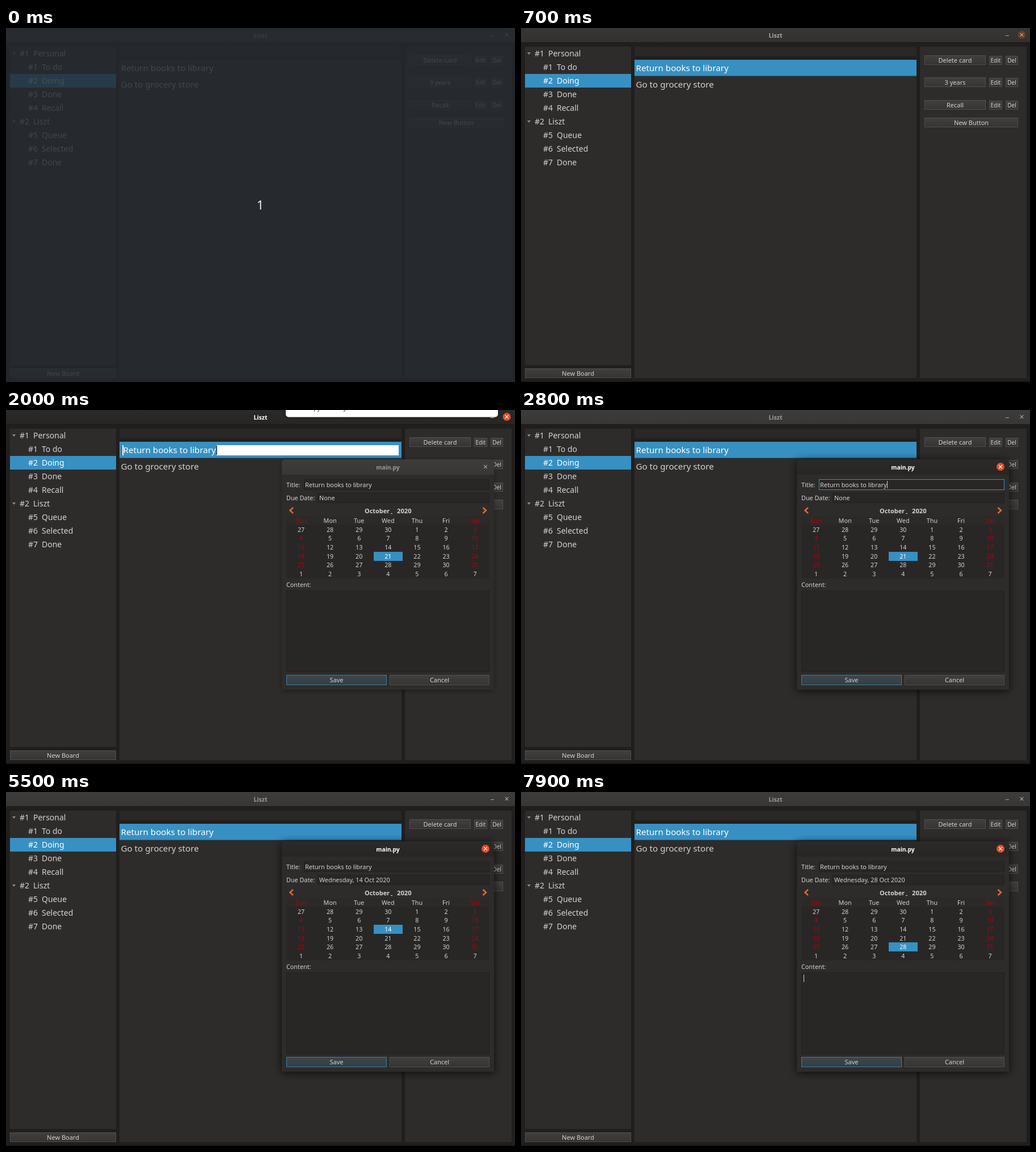
These frames come from a looping animation (897 by 624 pixels, 8000 ms). An HTML page with a canvas:

```html
<!DOCTYPE html>
<html lang="en">
<head>
<meta charset="utf-8">
<title>Card board</title>
<style>
  html, body { margin: 0; width: 100%; height: 100%; overflow: hidden; background: #201f1e; }
  canvas { display: block; }
</style>
</head>
<body>
<canvas id="stage" width="897" height="624"></canvas>
<script>
const c = document.getElementById('stage').getContext('2d');
const BLUE = '#3790c2', PANEL = '#2d2c2b', TEXT = '#d4d3d1', DARK = '#282726', EDGE = '#222120';
const clamp = v => Math.max(0, Math.min(1, v));

function rect(x, y, w, h, fill, border) {
  c.fillStyle = fill;
  c.fillRect(x, y, w, h);
  if (border) {
    c.lineWidth = 1;
    c.strokeStyle = border;
    c.strokeRect(x + .5, y + .5, w - 1, h - 1);
  }
}

function text(s, x, y, size, color = TEXT, align = 'left', weight = 400) {
  c.font = `${weight} ${size}px "Noto Sans", "Open Sans", sans-serif`;
  c.textAlign = align;
  c.fillStyle = color;
  c.fillText(s, x, y);
}

function line(points, color, width = 1) {
  c.beginPath();
  points.forEach(([x, y]) => c.lineTo(x, y));
  c.strokeStyle = color;
  c.lineWidth = width;
  c.stroke();
}

function gradient(y, h, top, bottom) {
  const g = c.createLinearGradient(0, y, 0, y + h);
  g.addColorStop(0, top);
  g.addColorStop(1, bottom);
  return g;
}

function button(label, x, y, w, h, size = 11, active) {
  const fill = active ? gradient(y, h, '#3e464c', '#343d43') : gradient(y, h, '#41403f', '#353433');
  rect(x, y, w, h, fill, active ? '#3a7da3' : '#504f4d');
  text(label, x + w / 2, y + h / 2 + size * .37, size, TEXT, 'center');
}

function cross(x, y, color) {
  line([[x - 2.8, y - 2.8], [x + 2.8, y + 2.8]], color, 1.2);
  line([[x + 2.8, y - 2.8], [x - 2.8, y + 2.8]], color, 1.2);
}

// Title bar, blending from the inactive to the active look
function titleBar(label, x, y, w, h, focus, radius, size, closeX) {
  const layer = (alpha, top, bottom, ink, active) => {
    if (!alpha) return;
    c.globalAlpha = alpha;
    c.fillStyle = gradient(y, h, top, bottom);
    c.beginPath();
    c.roundRect(x, y, w, h, [radius, radius, 0, 0]);
    c.fill();
    text(label, x + w / 2, y + h / 2 + 4, size, ink, 'center', 700);
    const cy = y + h / 2 - .5;
    if (active) {
      c.fillStyle = '#df4f28';
      c.beginPath();
      c.arc(closeX, cy, 7, 0, 7);
      c.fill();
    }
    cross(closeX, cy, active ? '#fff' : '#a9a7a5');
    if (!radius) rect(854, 13, 6, 1, active ? '#e8e6e4' : '#a9a7a5');
    c.globalAlpha = 1;
  };
  layer(1, '#3d3c3a', '#383735', '#9b9997', false);
  layer(focus, '#2b2a29', '#272625', '#fff', true);
}

function tree() {
  const rows = ['Personal', 'To do', 'Doing', 'Done', 'Recall', 'Liszt', 'Queue', 'Selected', 'Done'];
  rect(7, 33, 187, 561, PANEL);
  rect(7, 81, 187, 24, BLUE);
  let board = 0, list = 0;
  rows.forEach((name, i) => {
    const y = 45 + 24 * i, top = i % 5 === 0, x = top ? 24 : 39;
    const color = i === 2 ? '#fff' : TEXT;
    text('#' + (top ? ++board : ++list), x, y + 5, 14, color);
    text(name, x + 24, y + 5, 14, color);
    if (!top) return;
    c.fillStyle = '#8f8e8c';
    c.beginPath();
    c.moveTo(11, y - 2);
    c.lineTo(17, y - 2);
    c.lineTo(14, y + 2);
    c.fill();
  });
}

function cards(t) {
  const editing = t >= 800 && t < 2600;
  rect(200, 33, 497, 17, '#292827', '#272625');
  rect(200, 56, 497, 561, PANEL);
  if (t >= 700) rect(200, 56, 497, 28.5, BLUE);
  if (editing) {
    rect(205, 62, 487, 18, '#fff');
    rect(207, 62, 164, 18, BLUE);
    rect(204, 62, 1, 18, '#24617f');
    if (t < 1400 || t >= 2000) rect(371, 63, 1, 16, '#222');
  }
  text('Return books to library', editing ? 206.5 : 202.5, 76, 15.15, t >= 700 ? '#fff' : TEXT);
  text('Go to grocery store', 202.5, 105, 15.15);
}

function sidebar() {
  rect(703, 33, 188, 584, PANEL);
  ['Delete card', '3 years', 'Recall'].forEach((label, i) => {
    const y = 48 + Math.round(39.4 * i);
    button(label, 711, y, 108, 17);
    button('Edit', 825, y + 1, 23, 16, 10);
    button('Del', 854, y + 1, 22, 16, 10);
  });
  button('New Button', 711, 158, 165, 17);
}

function calendar(t, picked) {
  line([[506, 172], [500.5, 177], [506, 182]], '#e56a3c', 2.4);
  line([[840.5, 172], [846, 177], [840.5, 182]], '#e56a3c', 2.4);
  if (t >= 2300 && t < 2400) rect(684, 169, 36, 17, '#393837', '#504f4d');
  text('October', 632, 182, 10.9, TEXT, 'left', 700);
  text('2020', 689, 182, 11.2, TEXT, 'left', 700);
  rect(678, 182, 3, 1, TEXT);
  rect(494, 187, 358, 110, DARK);
  rect(494, 187, 358, 15, '#2b2a29');
  const color = col => col % 6 ? TEXT : '#b4000e';
  'Sun Mon Tue Wed Thu Fri Sat'.split(' ').forEach((day, i) =>
    text(day, 520 + 51.1 * i, 199, 10.8, color(i), 'center'));
  for (let i = 0; i < 42; i++) {
    const col = i % 7, row = Math.floor(i / 7), day = i - 3;
    const x = 520 + 51.1 * col, y = 210.5 + 15.7 * row;
    const outside = day < 1 || day > 31;
    const chosen = day === picked;
    if (chosen) rect(648, Math.round(y - 8), 51, 16, BLUE);
    else if (day === 14 && t >= 5200 && t < 5500) rect(648, 234, 51, 16, '#333f47');
    const ink = chosen ? '#fff' : outside && col === 6 && row === 5 ? TEXT : outside && col === 0 ? TEXT : color(col);
    text(day < 1 ? day + 30 : day > 31 ? day - 31 : day, x, y + 4, 10.7, ink, 'center');
  }
}

function dialog(t) {
  const focus = clamp((t - 2500) / 300);
  const picked = t < 5500 ? 21 : t < 6300 ? 14 : t < 6700 ? 21 : 28;
  c.save();
  c.shadowColor = `rgba(0,0,0,${.35 + .4 * focus})`;
  c.shadowBlur = 8 + 7 * focus;
  c.shadowOffsetY = 2;
  c.fillStyle = PANEL;
  c.beginPath();
  c.roundRect(486, 87, 374, 406, [6, 6, 0, 0]);
  c.fill();
  c.restore();
  titleBar('main.py', 486, 87, 374, 27, focus, 6, 10.3, 845);

  const titleFocus = t >= 2600 && t < 5200;
  text('Title:', 494, 136, 10.8);
  rect(525, 122, 327, 19, DARK, titleFocus ? BLUE : EDGE);
  text('Return books to library', 527, 136, 10.9);
  if (titleFocus && (t < 3400 || t >= 4000 && t < 4600)) rect(645, 125, 1, 13, TEXT);
  text('Due Date:', 494, 159, 10.8);
  rect(549, 146, 303, 18, DARK, EDGE);
  text(t < 5500 ? 'None' : `Wednesday, ${picked} Oct 2020`, 552, 159, 10.85);

  calendar(t, picked);
  text('Content:', 494, 312, 10.8);
  rect(494, 318, 358, 144, DARK, EDGE);
  if (t >= 7900) rect(498, 322, 1, 13, TEXT);
  button('Save', 494, 467, 177, 18, 11, true);
  button('Cancel', 676, 467, 176, 18);
}

function notification(t) {
  const bottom = t < 900 ? 8 : t < 1000 ? 16 : t < 2600 ? 12.5 : t < 2700 ? 8 : 3;
  c.save();
  c.shadowColor = 'rgba(0,0,0,.5)';
  c.shadowBlur = 5;
  c.fillStyle = '#fff';
  c.beginPath();
  c.roundRect(493, bottom - 60, 374, 60, 5);
  c.fill();
  c.restore();
  text('“main.py” is ready', 510.5, bottom - 13, 10.7, '#333');
}

function countdown() {
  rect(0, 0, 897, 624, 'rgba(37,41,48,.83)');
  text('1', 448, 320, 22, '#f2f2f2', 'center');
}

function draw(now) {
  const t = Math.floor(now % 8000 / 100) * 100;
  const focus = t < 2600 ? clamp((t - 600) / 300) : clamp((2800 - t) / 300);
  rect(0, 0, 897, 624, '#201f1e');
  titleBar('Liszt', 0, 0, 897, 25, focus, 0, 10.6, 882.5);
  rect(0, 25, 897, 1, '#1b1a19');
  rect(0, 622, 897, 2, '#191817');
  tree();
  button('New Board', 7, 600, 187, 17);
  cards(t);
  sidebar();
  if (t >= 800) dialog(t);
  if (t >= 800 && t < 2800) notification(t);
  if (t < 500) countdown();
  requestAnimationFrame(draw);
}
requestAnimationFrame(draw);
</script>
</body>
</html>
```
